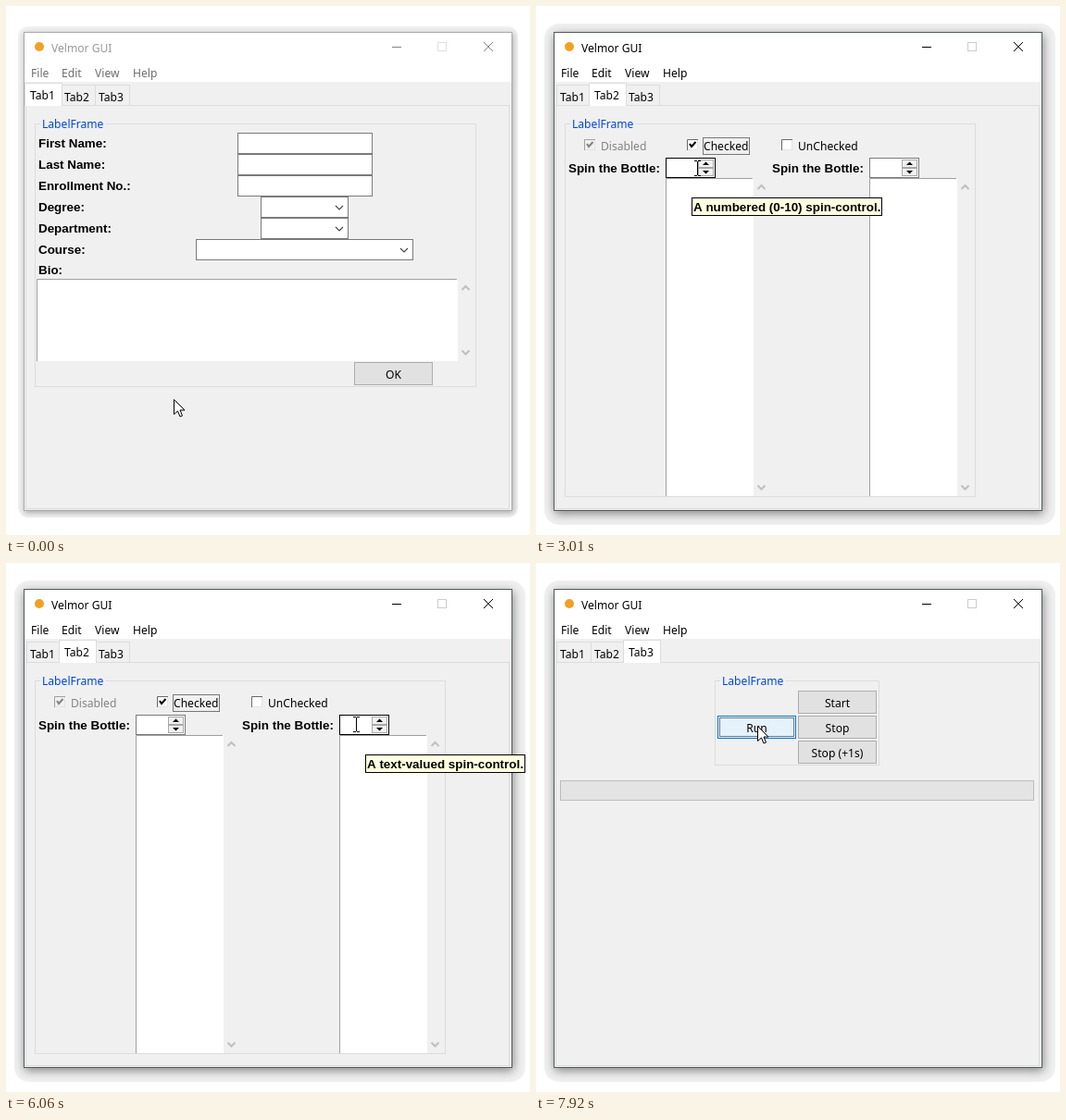
Write an HTML page with a canvas that moves like this. It is 566 by 572 pixels and loops after 8 s.

```html
<!DOCTYPE html>
<html lang="en">
<head>
<meta charset="utf-8">
<title>Tabbed form demo</title>
<style>
  html, body { margin: 0; width: 100%; height: 100%; overflow: hidden; background: #fff; }
  canvas { display: block; }
</style>
</head>
<body>
<canvas id="stage" width="566" height="572"></canvas>
<script>
const ctx = document.getElementById('stage').getContext('2d');
const LOOP = 8000;
const UI = '12.1px "Noto Sans", sans-serif';
const BOLD = 'bold 13.4px "Liberation Sans", Arial, sans-serif';
const FACE = '#f0f0f0', GROOVE = '#dcdcdc', EDGE = '#7a7a7a', ACCENT = '#0078d7';

// Pointer trips: start and end time, number of picture steps, start and end point.
const trips = [
  { start: 890, end: 1330, steps: 8, from: [181, 425], to: [71, 86] },
  { start: 2670, end: 3010, steps: 7, from: [71, 86], to: [174, 175] },
  { start: 4290, end: 4850, steps: 10, from: [174, 175], to: [390, 178] },
  { start: 6060, end: 6490, steps: 8, from: [390, 178], to: [109, 95] },
  { start: 7420, end: 7920, steps: 9, from: [109, 95], to: [239, 176] }
];

let mouse = [0, 0];
let textCursor = false;
const over = (x1, y1, x2, y2) =>
  mouse[0] >= x1 && mouse[0] < x2 && mouse[1] >= y1 && mouse[1] < y2;

function pointerAt(t) {
  let point = trips[0].from;
  for (const { start, end, steps, from, to } of trips) {
    if (t < start) break;
    const step = Math.floor((t - start) / (end - start) * (steps - 1) + 1e-6) + 1;
    const p = Math.min(1, step / steps);
    const eased = p * p * (3 - 2 * p);
    point = from.map((v, i) => Math.round(v + (to[i] - v) * eased));
  }
  return point;
}

function fill(x1, y1, x2, y2, color) {
  ctx.fillStyle = color;
  ctx.fillRect(x1, y1, x2 - x1, y2 - y1);
}

function box(x1, y1, x2, y2, border, color) {
  if (color) fill(x1, y1, x2, y2, color);
  ctx.strokeStyle = border;
  ctx.lineWidth = 1;
  ctx.strokeRect(x1 + .5, y1 + .5, x2 - x1 - 1, y2 - y1 - 1);
}

function line(points, color, width = 1) {
  ctx.strokeStyle = color;
  ctx.lineWidth = width;
  ctx.beginPath();
  points.forEach(([x, y]) => ctx.lineTo(x, y));
  ctx.stroke();
}

function polygon(points, color, border) {
  ctx.beginPath();
  points.forEach(([x, y]) => ctx.lineTo(x, y));
  ctx.closePath();
  ctx.fillStyle = color;
  ctx.fill();
  if (border) {
    ctx.strokeStyle = border;
    ctx.lineWidth = 1;
    ctx.stroke();
  }
}

// y is the vertical middle of the capitals.
function text(label, x, y, color = '#000', font = UI, align = 'left') {
  ctx.font = font;
  ctx.textAlign = align;
  ctx.fillStyle = color;
  ctx.fillText(label, x, y + 5);
}

function dotted(x1, y1, x2, y2) {
  ctx.setLineDash([1, 1]);
  box(x1, y1, x2, y2, '#000');
  ctx.setLineDash([]);
}

function chevron(x, y, dir, color, width) {
  line([[x - 4, y - 2 * dir], [x, y + 2 * dir], [x + 4, y - 2 * dir]], color, width);
}

function labelFrame(x1, y1, x2, y2) {
  box(x1, y1, x2, y2, GROOVE);
  fill(x1 + 6, y1, x1 + 76, y1 + 1, FACE);
  text('LabelFrame', x1 + 8, y1, '#0046d5');
}

function button(label, x, y, focused) {
  const hot = over(x, y, x + 85, y + 25);
  box(x, y, x + 85, y + 25, hot ? ACCENT : '#adadad', hot ? '#e5f1fb' : '#e1e1e1');
  if (focused) dotted(x + 2, y + 2, x + 83, y + 23);
  text(label, x + 42.5, y + 13, '#000', UI, 'center');
}

function combo(x1, y1, x2) {
  box(x1, y1, x2, y1 + 23, EDGE, '#fff');
  chevron(x2 - 10, y1 + 12, 1, '#444', 1.1);
}

function textArea(x1, y1, x2, y2) {
  fill(x1, y1, x2, y2, '#fff');
  line([[x1 + .5, y2], [x1 + .5, y1 + .5], [x2 - 1, y1 + .5]], '#a0a0a0');
  chevron(x2 + 8.5, y1 + 10, -1, '#bfbfbf', 2);
  chevron(x2 + 8.5, y2 - 9.5, 1, '#bfbfbf', 2);
  if (over(x1, y1, x2, y2)) textCursor = true;
}

function checkbox(label, x, checked, disabled) {
  const ink = disabled ? '#838383' : '#000';
  box(x, 144, x + 12, 156, '#e3e3e3', disabled ? FACE : '#fff');
  line([[x + .5, 156], [x + .5, 144.5], [x + 12, 144.5]], disabled ? '#a0a0a0' : '#696969');
  if (checked) line([[x + 3, 149], [x + 5, 152], [x + 9.5, 147]], ink, 2);
  text(label, x + 18, 151, ink);
}

function spinner(x, tip) {
  const hot = over(x, 164, x + 54, 186);
  text('Spin the Bottle:', x - 105, 175, '#000', BOLD);
  box(x, 164, x + 54, 186, hot ? '#000' : EDGE, '#fff');
  for (const [y, dir] of [[166, -1], [175, 1]]) {
    box(x + 35, y, x + 52, y + 9, '#a8a8a8', FACE);
    const mid = x + 43.5, cy = y + 4.5;
    polygon([[mid - 3.5, cy - 1.5 * dir], [mid + 3.5, cy - 1.5 * dir], [mid, cy + 2 * dir]], '#000');
  }
  textArea(x, 186, x + 95, 530);
  if (over(x, 164, x + 35, 186)) textCursor = true;
  return hot && { x: x + 28, tip };
}

function tooltip({ x, tip }) {
  ctx.font = BOLD;
  const width = Math.round(ctx.measureText(tip).width) + 4;
  box(x, 207, x + width, 227, '#000', '#ffffe1');
  text(tip, x + 2, 217, '#000', BOLD);
}

function formPage() {
  labelFrame(31, 127, 508, 412);
  ['First Name:', 'Last Name:', 'Enrollment No.:', 'Degree:', 'Department:', 'Course:', 'Bio:']
    .forEach((label, i) => text(label, 35, i < 6 ? 148 + 23 * i : 285, '#000', BOLD));
  for (const y of [137, 160, 183]) box(250, y, 396, y + 23, EDGE, '#fff');
  combo(275, 206, 370);
  combo(275, 229, 370);
  combo(205, 252, 440);
  textArea(33, 295, 488, 384);
  button('OK', 376, 385);
}

function spinPage() {
  labelFrame(31, 127, 475, 531);
  checkbox('Disabled', 52, true, true);
  checkbox('Checked', 163, true);
  checkbox('UnChecked', 265, false);
  dotted(180, 142, 231, 161);
  const tips = [
    spinner(140, 'A numbered (0-10) spin-control.'),
    spinner(360, 'A text-valued spin-control.')
  ];
  tips.filter(Boolean).forEach(tooltip);
}

function progressPage() {
  labelFrame(193, 127, 371, 219);
  button('Start', 283, 138);
  button('Run', 196, 165, true);
  button('Stop', 283, 165);
  button('Stop (+1s)', 283, 192);
  box(26, 235, 538, 257, '#bcbcbc', '#e4e4e4');
}

function windowChrome(active) {
  const halo = active ? [9, 19, 552, 542, 16] : [13, 22, 540, 531, 11];
  ctx.fillStyle = '#f0f0f0';
  ctx.beginPath();
  ctx.roundRect(...halo);
  ctx.fill();

  ctx.save();
  ctx.shadowColor = active ? 'rgba(0,0,0,.45)' : 'rgba(0,0,0,.3)';
  ctx.shadowBlur = active ? 10 : 6;
  ctx.shadowOffsetX = 1;
  ctx.shadowOffsetY = active ? 3 : 2;
  fill(19, 28, 547, 546, '#fff');
  ctx.restore();

  fill(20, 82, 546, 545, FACE);
  box(19, 28, 547, 546, active ? '#505a5c' : '#aaa');

  ctx.fillStyle = '#f2a024';
  ctx.beginPath();
  ctx.arc(36, 44, 5, 0, 2 * Math.PI);
  ctx.fill();
  text('Velmor GUI', 49, 45, active ? '#000' : '#999');

  const ink = active ? '#000' : '#858585';
  line([[417, 44.5], [427, 44.5]], ink);
  box(466, 39, 476, 49, active ? '#ccc' : '#e0e0e0');
  line([[516, 39], [526, 49]], ink);
  line([[526, 39], [516, 49]], ink);
  [['File', 27], ['Edit', 60], ['View', 96], ['Help', 137]]
    .forEach(([label, x]) => text(label, x, 72, active ? '#000' : '#6d6d6d'));
}

function tabs(selected) {
  box(21, 107, 544, 544, GROOVE, FACE);
  const left = i => 22 + 37 * i;
  for (let i = 0; i < 3; i++) {
    if (i === selected) continue;
    const x = left(i), hot = over(x, 85, x + 37, 108);
    box(x, 85, x + 38, 108, GROOVE, hot ? '#d8eaf9' : FACE);
    text('Tab' + (i + 1), x + 4, 98);
  }
  const x = left(selected);
  box(x - 2, 83, x + 39, 108, GROOVE, '#fff');
  fill(x - 1, 107, x + 38, 108, '#fff');
  text('Tab' + (selected + 1), x + 4, 96);
}

function drawPointer() {
  const [x, y] = mouse;
  if (textCursor) {
    fill(x, y - 7, x + 1, y + 8, '#000');
    for (const end of [y - 8, y + 8]) {
      fill(x - 3, end, x, end + 1, '#000');
      fill(x + 1, end, x + 4, end + 1, '#000');
    }
    return;
  }
  const arrow = [[0, 0], [0, 16], [4, 12.5], [6.5, 18.5], [9, 17.5], [6.5, 11.5], [11.5, 11.5]];
  polygon(arrow.map(([dx, dy]) => [x + .5 + dx, y + .5 + dy]), '#fff', '#000');
}

function draw(t) {
  const page = t < 1730 ? 0 : t < 6760 ? 1 : 2;
  mouse = pointerAt(t);
  textCursor = false;
  fill(0, 0, 566, 572, '#fff');
  windowChrome(page > 0);
  tabs(page);
  [formPage, spinPage, progressPage][page]();
  drawPointer();
}

const begin = performance.now();
function frame() {
  draw((performance.now() - begin) % LOOP);
  requestAnimationFrame(frame);
}
frame();
</script>
</body>
</html>
```
